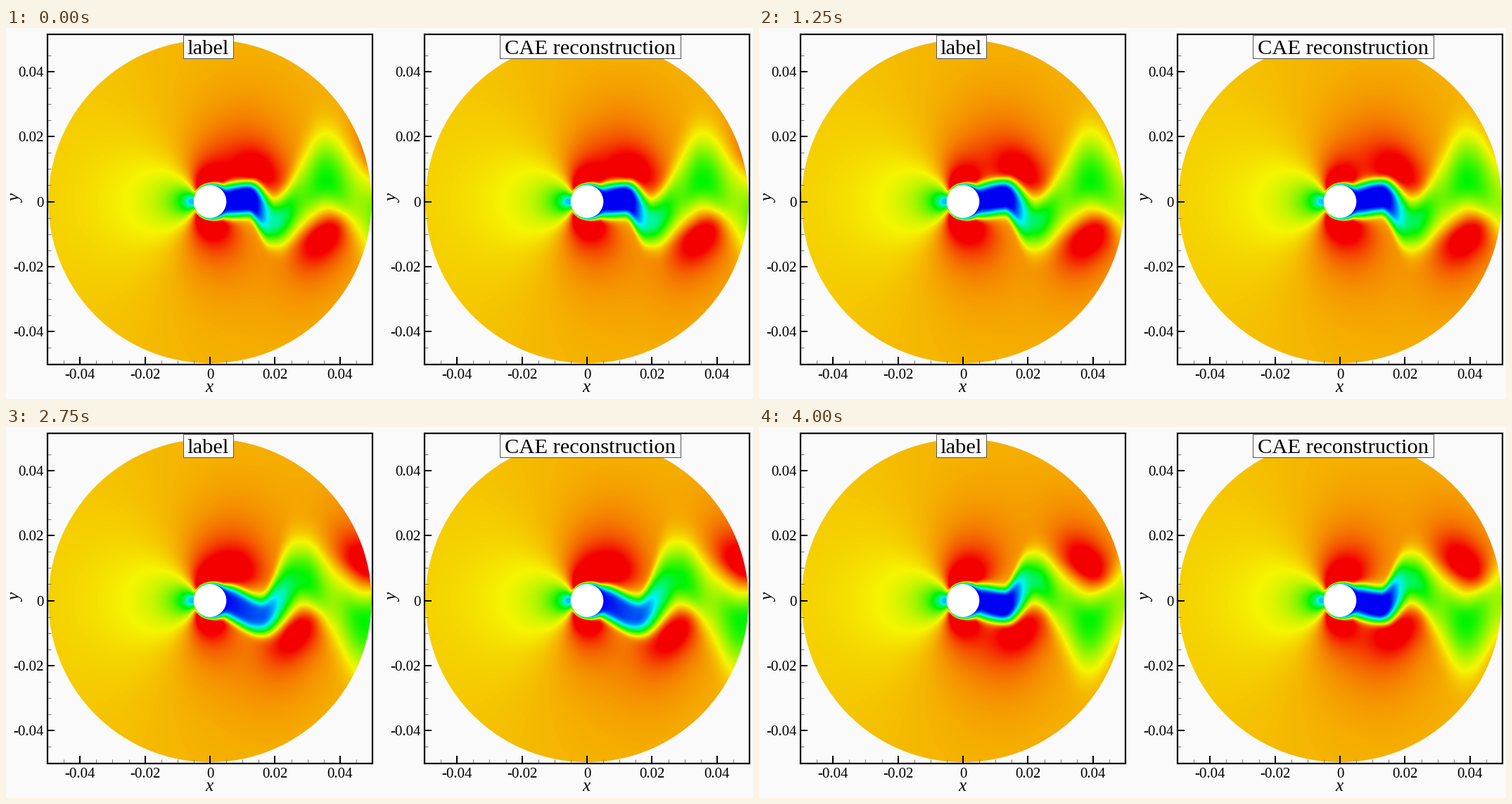
A matplotlib script for the animation above (4.25 s loop, 1062 by 527 pixels).

```python
import numpy as np
import matplotlib.pyplot as plt
from matplotlib.animation import FuncAnimation
from matplotlib.colors import LinearSegmentedColormap
from matplotlib.patches import Circle, Rectangle

W, H, DPI = 1062, 527, 100
PT = 72 / DPI
FRAMES, INTERVAL = 17, 250
UNIT = 46.2            # pixels per 0.01 on both axes
CX, CY = 290, 246.5    # cylinder centre in the left panel
SHIFT = 536            # distance between the panels
N = 462
HALF = 2.25            # half a wavelength of the vortex street

RAINBOW = LinearSegmentedColormap.from_list(
    "rainbow", ["#0000f2", "#00f4f8", "#00f500", "#f6f600", "#f40000"], N=512)

pix = np.arange(N) + 0.5
xs = (pix - N / 2) / UNIT
X, Y = np.meshgrid(xs, (CY - 15 - pix) / UNIT)
R = np.maximum(np.hypot(X, Y), 0.45)


def step(q, mid, width):
    """Smooth rise from 0 to 1 around mid."""
    return 1 / (1 + np.exp(-np.clip((q - mid) / width, -40, 40)))


def leave(q, start, mid, width):
    """Rest at start, then drift downstream at unit speed."""
    return start + width * np.log1p(np.exp((q - mid) / width))


def steady_flow():
    """Potential flow past the cylinder, with a source for the wake."""
    a2, m = 0.25, 0.1
    u = 1 - a2 * (X**2 - Y**2) / R**4 + m * X / R**2
    v = -2 * a2 * X * Y / R**4 + m * Y / R**2
    return np.clip(0.81 * np.hypot(u, v), 0.2, 1.05)


steady = steady_flow()
depth = 0.05 + 0.05 * step(X, .1, .15)
layer = 1 - 0.8 * np.exp(-((R - .5) / depth) ** 2) * step(X, -.4, .08)
gate = step(X, .08, .06)
power = 4 - 2 * np.clip(xs - 1.2, 0, 1)


def lobe(q, side, stretch):
    """Fast fluid on the outer side of a vortex at travel q."""
    dx = X / stretch - leave(q, .2, .2, .9)
    dy = side * Y - .8 - .3 * step(q, 2.5, .6) + .45 * step(q, 1.4, .3) * dx
    core = np.exp(-(dx / .75) ** 2 - (dy / np.where(dy > 0, .75, .5)) ** 2)
    halo = np.exp(-(dx / 1.3) ** 2 - (dy / np.where(dy > 0, 1.8, .7)) ** 2)
    return .18 * step(q, -.4, .4) * core + .08 * step(q, -.6, .5) * halo


def node(q, side, stretch):
    """Slow spot of a vortex: x, y, speed, width above and below, link."""
    grow = step(q, 2.3, .7)
    up, down = (.5 + .25 * grow, .5 + .9 * grow)[::side]
    return (leave(q, .85, 1, 1.5) * stretch, -.6 * side * step(q, -.2, .45),
            -.15 + .65 * step(q, .6, .55), up, down, .16 * step(q, .6, .15))


def field(frame):
    travel = 3.35 + 2.694 * frame + 1.15 * np.sin(np.pi * (frame - 1.5) / 16) ** 2
    stretch = 1 + .28 * np.exp(-((frame - 3) / 1.2) ** 2)
    value = steady.copy()
    nodes = [(.3, 0, 0, .5, .5, 0)]
    for k in range(-3, 4):
        q = travel % (2 * HALF) + HALF * k
        side = 1 if k % 2 else -1
        value += lobe(q, side, stretch)
        if q > -1.5:
            nodes.append(node(q, side, stretch))
    nodes = np.array(nodes)

    # eased path of the slow wake through its nodes
    i = np.clip(np.searchsorted(nodes[:, 0], xs) - 1, 0, len(nodes) - 2)
    a, b = nodes[i], nodes[i + 1]
    t = np.clip((xs - a[:, 0]) / (b[:, 0] - a[:, 0]), 0, 1)
    ease = (t * t * (3 - 2 * t))[:, None]
    _, yc, core, up, down, _ = (a + (b - a) * ease).T
    core = core + a[:, 5] * np.sin(np.pi * t) ** 2
    d = (Y - yc) / np.sqrt(1 + .3 * np.gradient(yc, xs) ** 2)
    wake = gate * np.exp(-np.abs(d / np.where(d > 0, up, down)) ** power)

    value *= layer
    return np.clip(value + (core - value) * wake, 0, 1)


fig = plt.figure(figsize=(W / DPI, H / DPI), dpi=DPI, facecolor="#fafafa")
ax = fig.add_axes([0, 0, 1, 1])


def text(x, y, s, size, ha="center", va="baseline", **kw):
    ax.text(x, y, s, fontsize=size * PT, family="Liberation Serif",
            ha=ha, va=va, color="black", zorder=8, **kw)


def line(x, y, width, color):
    ax.plot(x, y, color=color, lw=width * PT, solid_capstyle="butt", zorder=5)


def panel(x0, title, left, right):
    cx = CX + x0
    im = ax.imshow(np.zeros((N, N)), cmap=RAINBOW, vmin=0, vmax=1,
                   extent=(59 + x0, 521 + x0, 477, 15), aspect="auto",
                   interpolation="nearest", zorder=1)
    im.set_clip_path(Circle((cx, CY), 229.7, transform=ax.transData))
    ax.add_patch(Circle((cx, CY), 23.3, fc="white", ec="none", zorder=2))
    for k in range(-10, 11):
        off = k * UNIT / 2
        major = k % 4 == 0
        size, lw, color = (10, 2, "black") if major else (5, 1, "#777777")
        if abs(k) < 10:
            line([cx + off] * 2, [477, 477 - size], lw, color)
            line([59 + x0, 59 + x0 + size], [CY - off] * 2, lw, color)
        if major:
            label = f"{k * 0.005:.2f}" if k else "0"
            text(cx + off, 498, label, 21)
            text(54 + x0, CY - off + 7, label, 21, ha="right")
    ax.add_patch(Rectangle((59 + x0, 9), 462, 468.5, fill=False, ec="black",
                           lw=2.2 * PT, zorder=6))
    ax.add_patch(Rectangle((left, 10), right - left, 33, fc="#fcfcfc",
                           ec="#555555", lw=PT, zorder=7))
    text((left + right) / 2, 37, title, 30.5)
    text(cx - 1, 517, "x", 25, style="italic")
    text(15 + x0, 242, "y", 25, va="center", style="italic", rotation=90)
    return im


images = [panel(0, "label", 251.5, 323),
          panel(SHIFT, "CAE reconstruction", 701.5, 959)]
ax.set_xlim(0, W)
ax.set_ylim(H, 0)
ax.axis("off")


def update(frame):
    data = field(frame)
    for im in images:
        im.set_data(data)
    return images


anim = FuncAnimation(fig, update, frames=FRAMES, interval=INTERVAL,
                     repeat=True, repeat_delay=0, blit=False)
plt.show()
```
